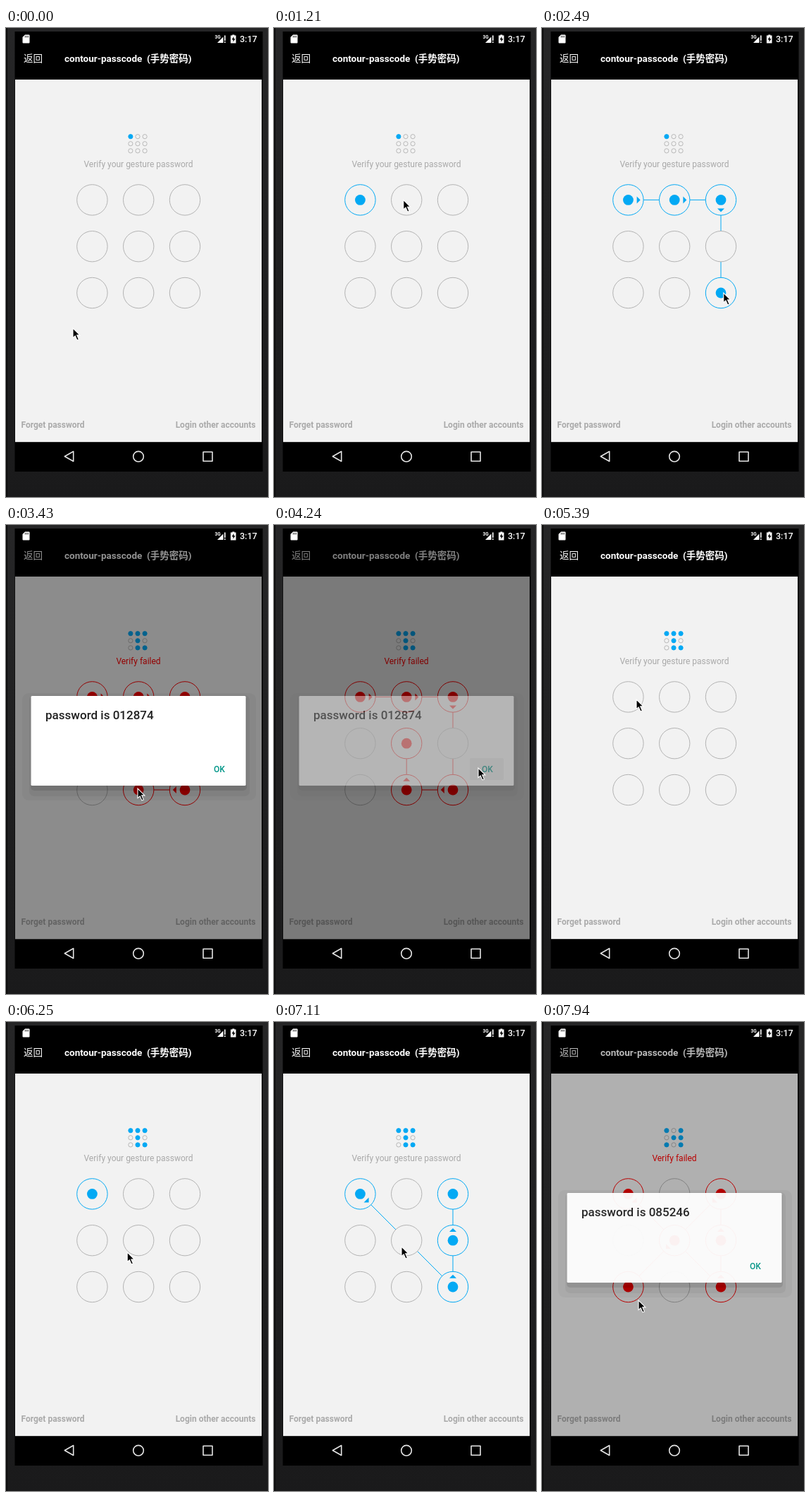
Recreate the animation shown at these times as an HTML page. Size 372 by 664 pixels, loop 7.99 s.

```html
<!DOCTYPE html>
<html lang="en">
<head>
<meta charset="utf-8">
<title>Pattern lock</title>
<style>
  html, body { margin: 0; width: 100%; height: 100%; overflow: hidden; background: #1c1c1d; }
  svg { display: block; width: 100vw; height: 100vh; }
  text { font-family: Roboto, "Noto Sans CJK SC", "Noto Sans CJK", sans-serif; font-size: 12px; white-space: pre; }
  .bar { font-size: 13.5px; fill: #fff; }
  .bold { font-weight: 700; }
  .medium { font-weight: 500; }
</style>
</head>
<body>
<svg viewBox="0 0 372 664">
  <defs>
    <linearGradient id="side" x2="0" y2="1">
      <stop offset="0" stop-color="#262627"/>
      <stop offset="1" stop-color="#1a1a1b"/>
    </linearGradient>
  </defs>
  <rect width="372" height="664" fill="url(#side)"/>
  <rect width="2" height="664" fill="#0c0c0c"/>
  <rect x="12.5" y="5" width="352" height="623"/>
  <rect x="13" y="73" width="350" height="513" fill="#f2f2f2"/>
  <rect x="13" y="586" width="350" height="1" fill="#2a2a2a"/>

  <g fill="#fff">
    <path d="M27 9.5h5.5q1 0 1 1v10q0 1-1 1h-8q-1 0-1-1v-7.5z"/>
    <path d="M27.3 11v2.5M29.3 11v2.5M31.3 11v2.5" stroke="#000" stroke-width=".8"/>
    <text x="296.5" y="15" class="bold" style="font-size:6.5px">3G</text>
    <path d="M300 21L308.5 12.5V21z"/>
    <path d="M310 10.5h1.6v7.5h-1.6zM310 19.3h1.6v1.7h-1.6z"/>
    <path d="M321.3 10.5v-1h3v1h2.2v11h-7.6v-11z"/>
    <path d="M323.5 12l-3 4.6h2v3.2l3-4.6h-2z" fill="#000"/>
    <text x="332" y="20.3" class="medium" style="font-size:12.5px">3:17</text>
  </g>
  <text x="25" y="48" class="bar">返回</text>
  <text x="83" y="48" class="bar bold">contour-passcode  (手势密码)</text>

  <g id="mini"></g>
  <text id="hint" x="188" y="197" text-anchor="middle"></text>
  <g id="lock"></g>
  <g class="bold" fill="#aaa">
    <text x="21.5" y="566">Forget password</text>
    <text x="354.5" y="566" text-anchor="end">Login other accounts</text>
  </g>

  <rect id="dim" x="13" y="35" width="350" height="551"/>
  <g id="dialog">
    <rect x="23" y="238" width="332" height="152" rx="9" opacity=".035"/>
    <rect x="33" y="241" width="313" height="143" rx="7" opacity=".05"/>
    <rect x="35" y="242" width="307" height="134" rx="5" opacity=".1"/>
    <rect x="35.5" y="242" width="305" height="127" rx="1.5" fill="#fff"/>
    <rect id="press" x="278" y="330" width="48" height="31" rx="1.5" opacity=".06"/>
    <text id="message" x="56" y="275" class="medium" style="font-size:17px" fill="#212121"></text>
    <text x="295" y="349.7" class="medium" fill="#009688">OK</text>
  </g>

  <g fill="none" stroke="#e4e4e4" stroke-width="1.6" stroke-linejoin="round">
    <path d="M83.3 606.5L95.7 599.5V613.5z"/>
    <circle cx="188" cy="606.7" r="7.3"/>
    <rect x="280" y="600.2" width="13" height="13"/>
  </g>
  <path id="cursor" d="M0 0V13.6L3.2 10.8L5.9 16.9L8.3 15.9L5.7 9.9H9.9z" stroke="#fff" stroke-width="1.1"/>
</svg>
<script>
const LOOP = 7990, FAIL_1 = 3310, CLOSE = 4240, RESET = 4590, FAIL_2 = 7880;
const BLUE = '#03a9f4', RED = '#f00', GRAY = '#b3b3b3', PAPER = '#f2f2f2';
const $ = id => document.getElementById(id);
const clamp = v => Math.min(1, Math.max(0, v));

const nodes = [...Array(9).keys()];
const gridSpot = (i, x, y, gap) => [x + gap * (i % 3 - 1), y + gap * (Math.floor(i / 3) - 1)];
const spot = i => gridSpot(i, 188.2, 309.2, 65.8);

// Pointer moves: start, end, then evenly timed stops. A bare number is a dot to select.
const moves = [
  [60, 810, [145, 268]],
  [860, 1610, 0, 1, 2, [300, 252]],
  [1670, 2010, [309, 300], 8],
  [2490, 3010, 7, 4],
  [3250, FAIL_1, [187, 373]],
  [3560, 3950, [290, 344]],
  [4590, 5000, [280, 358]],
  [5000, 5360, [134, 247]],
  [5600, 5740, 0],
  [5800, 6590, [158, 318], 8],
  [6650, 6900, 5, 2],
  [6900, 7110, [181, 318]],
  [7120, 7160, 4],
  [7160, 7460, 6],
  [7860, FAIL_2, [137, 394]]
];

const keys = [{ t: 0, x: 95, y: 425 }];
for (const [start, end, ...stops] of moves) {
  keys.push({ ...keys[keys.length - 1], t: start, dot: undefined });
  stops.forEach((stop, i) => {
    const t = start + (end - start) * (i + 1) / stops.length;
    if (Array.isArray(stop)) return keys.push({ t, x: stop[0], y: stop[1] });
    const [x, y] = spot(stop);
    keys.push({ t, x: x + 4, y, dot: stop });
  });
}

function pointerAt(t) {
  const next = keys.findIndex(k => k.t > t);
  if (next < 0) return keys[keys.length - 1];
  const a = keys[next - 1], b = keys[next], u = (t - a.t) / (b.t - a.t);
  return { x: a.x + (b.x - a.x) * u, y: a.y + (b.y - a.y) * u };
}

const dotsBetween = (from, to) =>
  keys.filter(k => k.dot !== undefined && k.t >= from && k.t <= to).map(k => k.dot);

function arrow(a, b) {
  const [x1, y1] = spot(a), [x2, y2] = spot(b);
  const angle = Math.atan2(y2 - y1, x2 - x1) * 180 / Math.PI;
  return `<path d="M12.2 -5L17.2 0L12.2 5z" transform="rotate(${angle})"/>`;
}

function lockMarkup(path, color) {
  const line = `<polyline points="${path.map(spot).join(' ')}" fill="none" stroke="${color}"/>`;
  const rings = nodes.map(i => {
    const step = path.indexOf(i), on = step >= 0, next = path[step + 1];
    return `<g transform="translate(${spot(i)})" fill="${color}">` +
      `<circle r="21.7" fill="${PAPER}" stroke="${on ? color : GRAY}"/>` +
      (on ? '<circle r="7.4"/>' : '') +
      (on && next !== undefined ? arrow(i, next) : '') + '</g>';
  });
  return line + rings.join('');
}

function miniMarkup(lit) {
  return nodes.map(i => {
    const on = lit.includes(i), [x, y] = gridSpot(i, 187, 163.8, 10.1);
    return `<circle cx="${x}" cy="${y}" r="3.1" fill="${on ? BLUE : 'none'}" ` +
      `stroke="${on ? BLUE : GRAY}" stroke-width=".9"/>`;
  }).join('');
}

// Opacity of the backdrop and the dialog
function fades(t, fail, closing) {
  if (t < fail) return [0, 0];
  if (closing) {
    const left = 1 - clamp((t - CLOSE + 35) / 215);
    return [.6 * left, left ** 4.4];
  }
  const age = t - fail + 20;
  return [.6 * (1 - (1 - clamp(age / 310)) ** 2), 1 - (1 - clamp(age / 130)) ** 3];
}

function draw(t) {
  const first = t < RESET;
  const start = first ? 0 : RESET, fail = first ? FAIL_1 : FAIL_2;
  const failed = t >= fail, closing = first && t >= CLOSE;
  const path = dotsBetween(start, t);
  const color = failed ? RED : BLUE;
  const checked = failed ? path : first ? [0] : dotsBetween(0, FAIL_1);

  $('mini').innerHTML = miniMarkup(checked);
  $('lock').innerHTML = lockMarkup(path, color);
  $('hint').textContent = failed ? 'Verify failed' : 'Verify your gesture password';
  $('hint').setAttribute('fill', failed ? RED : '#a9a9a9');

  const [dim, dialog] = fades(t, fail, closing);
  $('dim').setAttribute('opacity', dim);
  $('dialog').setAttribute('opacity', dialog);
  $('press').setAttribute('visibility', closing ? 'visible' : 'hidden');
  $('message').textContent = 'password is ' + path.join('');

  const { x, y } = pointerAt(t);
  $('cursor').setAttribute('transform', `translate(${x} ${y})`);
}

const begin = performance.now();
function tick() {
  draw((performance.now() - begin) % LOOP);
  requestAnimationFrame(tick);
}
tick();
</script>
</body>
</html>
```
